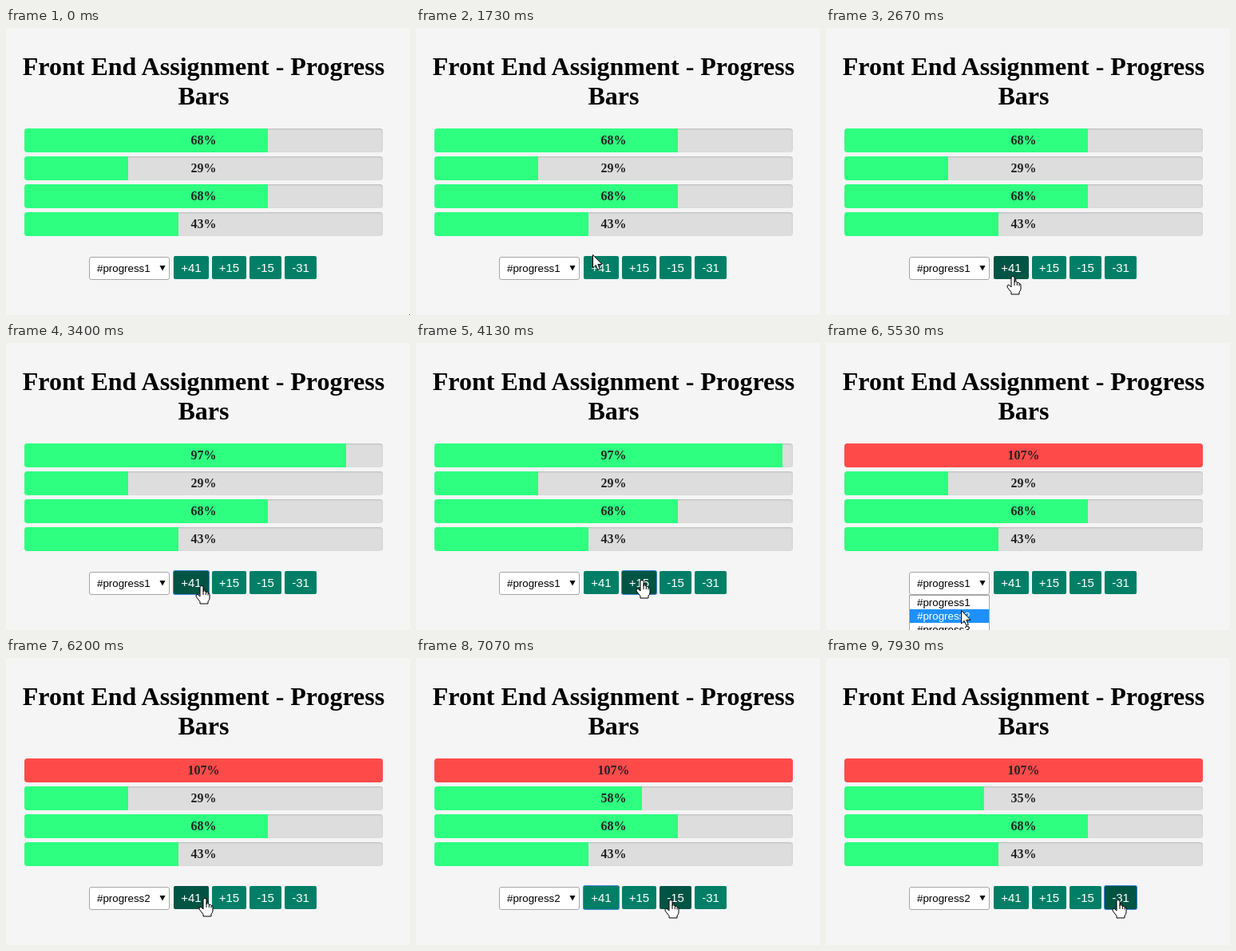
An HTML page for the animation above (8000 ms loop, 506x360 px).

```html
<!DOCTYPE html>
<html lang="en">
<head>
<meta charset="utf-8">
<title>Progress Bars</title>
<style>
html, body { margin: 0; width: 100%; height: 100%; overflow: hidden; background: #f5f5f5; }
#stage { position: relative; width: 506px; height: 360px; overflow: hidden; cursor: default; }
#stage > * { position: absolute; box-sizing: border-box; }
h1 { left: 0; top: 30px; width: 495px; margin: 0; text-align: center; white-space: nowrap;
  font: bold 32px/37px "Liberation Serif", serif; color: #000; }
.bar { left: 23px; width: 449px; height: 30px; border-radius: 4px; overflow: hidden;
  background: #ddd; box-shadow: inset 0 1px 2px rgba(0, 0, 0, .15); }
.fill { height: 100%; background: #2eff80; }
.over { background: #ff4a4a; }
.label { position: absolute; inset: 0; text-align: center; color: #222;
  font: bold 16px/30px "Liberation Serif", serif; }
.button { top: 286px; height: 29px; border-radius: 2px; background: #007f66; color: #fff;
  text-align: center; font: 15px/29px "Liberation Sans", sans-serif; }
.hover { background: #005444; }
.focus { box-shadow: 0 0 0 1px #3f86d8; }
#select, #list { left: 104px; width: 101px; background: #fff; color: #000;
  font: 13.333px/17px "Liberation Sans", sans-serif; }
#select { top: 287px; height: 29px; padding: 5px 0 0 9px; border: 1px solid #a6a6a6; border-radius: 3px; }
#select svg { position: absolute; left: 87px; top: 10px; }
#list { top: 316px; border: 1px solid #a6a6a6; }
#list div { padding-left: 9px; }
#list .active { background: #1e90ff; color: #fff; }
#cursor { left: 0; top: 0; width: 1px; height: 1px; overflow: visible; }
#cursor path { stroke: #000; stroke-width: 1; stroke-linejoin: round; fill: #fff; }
#cursor .lines { fill: none; }
</style>
</head>
<body>
<div id="stage">
  <h1>Front End Assignment - Progress<br>Bars</h1>
  <div id="select"><span></span><svg width="8" height="7"><path d="M.5 0h7L4 6.5z"/></svg></div>
  <div id="list"></div>
  <svg id="cursor">
    <path id="arrow" d="M.5 .5V17L4.2 13.4L6.7 19.3L9.3 18.2L6.8 12.4H12Z"/>
    <g id="hand">
      <path d="M-2 14V2.2Q-2 .5 0 .5T2 2.2V8Q4-.0 4 7.5Q5 7 5.3 8.5Q7.5 7.5 8 9.5Q10 9.5 10 11.5V16Q10 18.5 8 20V23H-2V20.5L-7 14Q-7.5 11.2-5 11.2Z"/>
      <path class="lines" d="M2 8v4M5.3 8.5v3.5M8 9.5v3"/>
    </g>
  </svg>
</div>
<script>
const LOOP = 8000, FPS = 15, GROW = 600;
const $ = id => document.getElementById(id);
const stage = $("stage"), cursor = $("cursor");

function add(parent, className, before = null) {
  const el = document.createElement("div");
  el.className = className;
  return parent.insertBefore(el, before);
}

// Each step: [time of click, percent]
const bars = [
  [[0, 68], [3130, 97], [4200, 107]],
  [[0, 29], [6530, 58], [7620, 35]],
  [[0, 68]],
  [[0, 43]]
].map((steps, i) => {
  const bar = add(stage, "bar", $("select"));
  bar.style.top = 126 + 35 * i + "px";
  return { steps, fill: add(bar, "fill"), label: add(bar, "label") };
});

// Focus spans: [from, to]
const buttons = [
  { text: "+41", x: 210, w: 44, focus: [[3065, 4130], [6465, 7530]] },
  { text: "+15", x: 258, w: 43, focus: [[4130, 5065]] },
  { text: "-15", x: 305, w: 40, focus: [] },
  { text: "-31", x: 349, w: 40, focus: [[7530, LOOP]] }
];
for (const b of buttons) {
  b.el = add(stage, "button", $("list"));
  b.el.textContent = b.text;
  b.el.style.left = b.x + "px";
  b.el.style.width = b.w + "px";
}

const options = [1, 2, 3, 4].map(n => {
  const el = add($("list"), "");
  el.textContent = "#progress" + n;
  return el;
});

// Pointer stops: [time, x, y]
const path = [
  [0, 505, 359], [133, 502, 343], [270, 502, 343], [530, 330, 328], [800, 145, 345],
  [1070, 145, 345], [1400, 74, 320], [1730, 221, 284], [1930, 241, 262], [1940, 241, 262],
  [2300, 305, 157], [2665, 234, 311], [2800, 234, 311], [2930, 234, 306], [3200, 234, 306],
  [3865, 283, 297], [4270, 283, 297], [4795, 169, 302], [5200, 169, 302], [5600, 169, 338],
  [5730, 169, 338], [6200, 249, 301], [6330, 252, 303], [6650, 252, 303], [7265, 341, 303],
  [7500, 366, 303], [LOOP, 366, 303]
];

const mix = (a, b, p) => a + (b - a) * p;

// CSS "ease": cubic-bezier(.25, .1, .25, 1)
function ease(x) {
  if (x >= 1) return 1;
  const bezier = (a, b, s) => 3 * a * s * (1 - s) ** 2 + 3 * b * s * s * (1 - s) + s ** 3;
  let lo = 0, hi = 1;
  for (let i = 0; i < 20; i++) {
    const mid = (lo + hi) / 2;
    if (bezier(.25, .25, mid) < x) lo = mid; else hi = mid;
  }
  return bezier(.1, 1, lo);
}

function pointerAt(t) {
  const i = Math.max(1, path.findIndex(stop => stop[0] >= t));
  const [t0, x0, y0] = path[i - 1], [t1, x1, y1] = path[i];
  const p = (t - t0) / (t1 - t0), s = p * p * (3 - 2 * p);
  return [Math.round(mix(x0, x1, s)), Math.round(mix(y0, y1, s))];
}

function drawBar({ steps, fill, label }, t) {
  const i = steps.findLastIndex(step => step[0] <= t);
  const [start, value] = steps[i];
  const from = steps[Math.max(0, i - 1)][1];
  const width = mix(Math.min(from, 100), Math.min(value, 100), ease((t - start) / GROW));
  fill.style.width = width + "%";
  fill.classList.toggle("over", value > 100);
  label.textContent = value + "%";
}

function draw(t) {
  const [x, y] = pointerAt(t);
  let onButton = false;
  bars.forEach(bar => drawBar(bar, t));
  for (const b of buttons) {
    const hover = x >= b.x && x < b.x + b.w && y >= 286 && y < 315;
    onButton = onButton || hover;
    b.el.classList.toggle("hover", hover);
    b.el.classList.toggle("focus", b.focus.some(([from, to]) => t >= from && t < to));
  }
  const open = t >= 5065 && t < 5795;
  $("list").style.display = open ? "" : "none";
  options.forEach((el, i) => el.classList.toggle("active", i === (y >= 334 ? 1 : 0)));
  $("select").firstChild.textContent = t < 5795 ? "#progress1" : "#progress2";
  cursor.style.transform = `translate(${x}px, ${y}px)`;
  $("arrow").style.display = onButton ? "none" : "";
  $("hand").style.display = onButton ? "" : "none";
}

// The screen refreshes at a fixed rate; the small offset absorbs rounded times.
const begin = performance.now();
function tick() {
  const t = Math.max(0, performance.now() - begin) % LOOP;
  draw(Math.floor((t + 4) * FPS / 1000) % (LOOP * FPS / 1000) * 1000 / FPS);
  requestAnimationFrame(tick);
}
tick();
</script>
</body>
</html>
```
